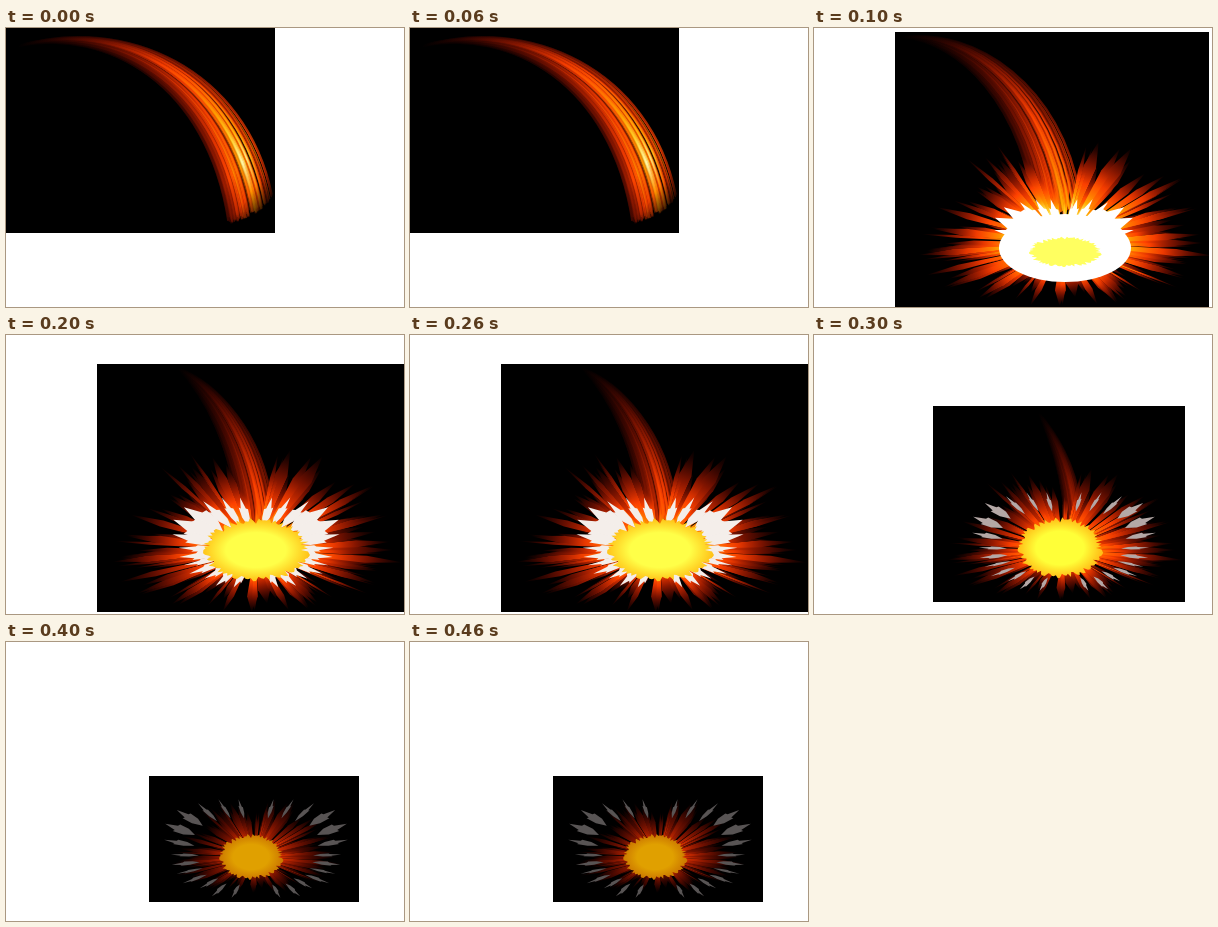
Write an HTML page with a canvas that moves like this. It is 398 px wide and 279 px high and loops after 500 ms.

```html
<!DOCTYPE html>
<html>
<head>
<meta charset="utf-8">
<style>
html, body { margin: 0; width: 100%; height: 100%; overflow: hidden; background: #fff; }
canvas { display: block; }
</style>
</head>
<body>
<canvas id="stage" width="398" height="279"></canvas>
<script>
const ctx = document.getElementById('stage').getContext('2d');
const STEP_MS = 100, CX = 249, CY = 215;

// The comet's tail retracts while the burst spreads, cools and shrinks.
const steps = [
  { box: [0, 0, 269, 205], comet: { x: 12, y: 18, heat: .95, peak: .83 } },
  { box: [81, 4, 314, 275], comet: { x: 88, y: 9, heat: .85, peak: 1 },
    rays: { size: 152, heat: 1.65 },
    shards: { color: '#fff', grow: .76, depth: .6, width: 2.2 }, crown: true,
    ball: { x: 251, y: 224, rx: 34, ry: 14, color: '#ffff60', rim: '#ffff60' } },
  { box: [91, 29, 307, 248], comet: { x: 172, y: 33, heat: .62, peak: 1 },
    rays: { size: 150, heat: 1.2 },
    shards: { color: '#f4eeea', grow: .91, depth: .55, width: 2.2 },
    ball: { x: 250, y: 215, rx: 50, ry: 29, color: '#ffff48', rim: '#ffb810' } },
  { box: [119, 71, 252, 196], comet: { x: 225, y: 78, heat: .42, peak: 1 },
    rays: { size: 122, heat: 1.05 },
    shards: { color: '#b4a8a6', grow: 1, depth: .33, width: 1 },
    ball: { x: 246, y: 213, rx: 40, ry: 28, color: '#ffff38', rim: '#ffb010' } },
  { box: [143, 134, 210, 126],
    rays: { size: 88, heat: .62 },
    shards: { color: '#585454', grow: 1, depth: .33, width: 1 },
    ball: { x: 245, y: 215, rx: 30, ry: 21, color: '#e0a000', rim: '#c87000' } }
];

const clamp = v => Math.max(0, Math.min(1, v));

function seeded(seed) {
  return () => (seed = seed * 16807 % 2147483647) / 2147483647;
}

// Black, red, orange, yellow, white for v from 0 to 1.
function heatColor(v) {
  const rgb = [v * 2.3, v * (v + .15), v * 5 - 4].map(c => Math.round(255 * clamp(c)));
  return `rgb(${rgb})`;
}

function heatGradient(gradient, heatAt) {
  for (let i = 0; i <= 12; i++) gradient.addColorStop(i / 12, heatColor(clamp(heatAt(i / 12))));
  return gradient;
}

function drawComet({ x, y, heat, peak }) {
  const random = seeded(71);
  const reach = 266 - x, spread = Math.min(44, reach * .35), drop = 166 - y;
  for (let i = 0; i < 130; i++) {
    const u = random(), lift = .3 - .52 * reach / 253 + .1 * u;
    const endX = 266 - spread * u, endY = 166 + 32 * Math.sqrt(u) * (.7 + .3 * random());
    const dx = endX - x;
    const glow = heat * Math.exp(-(((u - .35) / .5) ** 2)) * (.45 + .6 * random());
    ctx.strokeStyle = heatGradient(ctx.createLinearGradient(x, y, 246, 203), t =>
      glow * (t / peak) ** 1.15 * (peak < 1 ? clamp((1 - t) * 8) : 1));
    ctx.lineWidth = .6 + random() * 2;
    ctx.globalAlpha = .65;
    ctx.beginPath();
    ctx.moveTo(x, y);
    ctx.bezierCurveTo(x + dx * .42, y + drop * lift, x + dx * .9, y + drop * (lift + .38), endX, endY);
    ctx.stroke();
  }
  ctx.globalAlpha = 1;
}

function drawRays({ size, heat }) {
  const random = seeded(29);
  for (let i = 0; i < 170; i++) {
    const a = random() * Math.PI * 2, r = size * (.6 + .4 * random());
    const half = .015 + random() * .05, power = heat * (.65 + .35 * random());
    const at = (angle, d) =>
      [CX + Math.cos(angle) * d, CY + Math.sin(angle) * d * (.6 - .18 * Math.sin(angle))];
    const tip = at(a, r);
    ctx.fillStyle = heatGradient(ctx.createLinearGradient(CX, CY, ...tip), t => power * (1 - t) ** 1.2);
    ctx.beginPath();
    ctx.moveTo(CX, CY);
    ctx.lineTo(...at(a - half, r * .75));
    ctx.lineTo(...tip);
    ctx.lineTo(...at(a + half, r * .75));
    ctx.fill();
  }
}

// Mirrored splinters around an ellipse, largest at the upper corners.
function drawShards({ color, grow, depth, width }) {
  const random = seeded(5);
  ctx.fillStyle = color;
  for (let a = -1.36; a < 1.4; a += .22) {
    const corner = Math.exp(-(((a + .62) / .3) ** 2));
    const size = grow * (1 + .23 * corner) * (.95 + .08 * random());
    const tipX = Math.cos(a) * 88 * size, tipY = Math.sin(a) * (a < 0 ? 62 : 44) * size;
    const half = (3.5 + 5.5 * corner) * (.7 + .6 * random()) * width / 2 / Math.hypot(tipX, tipY);
    for (const side of [-1, 1]) {
      const point = (along, across) => {
        const k = 1 - depth * along, n = half * across;
        ctx.lineTo(250 + side * (tipX * k - tipY * n), CY + tipY * k + tipX * n);
      };
      ctx.beginPath();
      point(0, 0); point(.35, .6); point(.3, 1); point(.65, .9);
      point(1, .1); point(.75, -.8); point(.45, -1); point(.4, -.55);
      ctx.fill();
    }
  }
}

function drawCrown() {
  ctx.beginPath();
  ctx.ellipse(251, 220, 66, 34, 0, 0, 7);
  ctx.fill();
}

function drawBall({ x, y, rx, ry, color, rim }) {
  const random = seeded(13);
  ctx.save();
  ctx.translate(x, y);
  ctx.scale(rx, ry);
  const fill = ctx.createRadialGradient(0, 0, .6, 0, 0, 1.15);
  fill.addColorStop(0, color);
  fill.addColorStop(1, rim);
  ctx.fillStyle = fill;
  ctx.beginPath();
  for (let i = 0; i < 120; i++) {
    const a = i / 60 * Math.PI, r = .9 + .2 * random();
    ctx.lineTo(Math.cos(a) * r, Math.sin(a) * r);
  }
  ctx.fill();
  ctx.restore();
}

function draw({ box, comet, rays, shards, crown, ball }) {
  ctx.clearRect(0, 0, 398, 279);
  ctx.save();
  ctx.fillStyle = '#000';
  ctx.fillRect(...box);
  ctx.beginPath();
  ctx.rect(...box);
  ctx.clip();
  ctx.globalCompositeOperation = 'lighten';
  if (rays) drawRays(rays);
  if (comet) drawComet(comet);
  ctx.globalCompositeOperation = 'source-over';
  if (shards) drawShards(shards);
  if (crown) drawCrown();
  if (ball) drawBall(ball);
  ctx.restore();
}

let shown = -1;
const start = performance.now();
function tick() {
  const index = Math.floor((performance.now() - start) / STEP_MS) % steps.length;
  if (index !== shown) draw(steps[shown = index]);
  requestAnimationFrame(tick);
}
tick();
</script>
</body>
</html>
```
